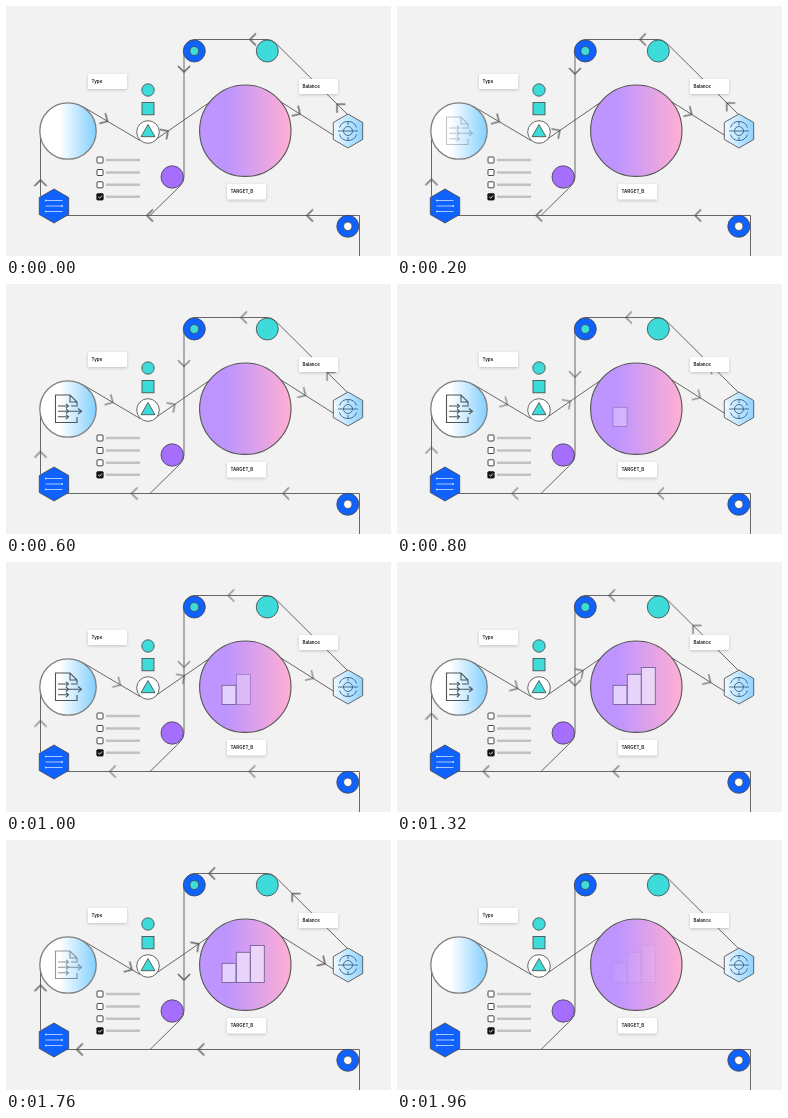
These frames come from a looping animation (385x250 px, 2000 ms). An HTML page:

```html
<!DOCTYPE html>
<html lang="en">
<head>
<meta charset="utf-8">
<title>Data flow</title>
<style>
html, body { margin: 0; width: 100%; height: 100%; overflow: hidden; background: #f2f2f2; }
svg { display: block; width: 385px; height: 250px; }
text { font: 600 4.5px Inter, "Open Sans", sans-serif; fill: #161616; }
.line { fill: none; stroke: #444; stroke-width: .8; }
.node { stroke: #444; stroke-width: .8; }
.blue { fill: #0f62fe; }
.teal { fill: #3ddbd9; }
.label rect { fill: #fff; filter: drop-shadow(0 1px 1.5px #0003); }

.arrows { fill: none; stroke: #555; stroke-width: 1.5; animation: tone 2s linear infinite; }
.arrows use { animation: travel 2s infinite; }
.doc { fill: none; stroke: #4d5358; stroke-width: 1.1; animation: doc 2s linear infinite; }
.bars rect { fill: #f4ecffb0; stroke: #76609a; stroke-width: .9; animation: 2s linear infinite; }
.bars rect:nth-child(1) { animation-name: bar1; }
.bars rect:nth-child(2) { animation-name: bar2; }
.bars rect:nth-child(3) { animation-name: bar3; }

@keyframes travel {
  0% {
    transform: translate(var(--from)) rotate(var(--turn));
    animation-timing-function: cubic-bezier(.364, 0, .636, 1);
  }
  98%, 100% { transform: translate(var(--to)) rotate(var(--turn)); }
}
@keyframes tone {
  0% { opacity: .9; }
  20% { opacity: .75; }
  40%, 50% { opacity: .62; }
  66% { opacity: .72; }
  88%, 90% { opacity: .9; }
  97.5%, 100% { opacity: 0; }
}
@keyframes doc {
  0%, 5% { opacity: 0; }
  20%, 82% { opacity: 1; }
  97%, 100% { opacity: 0; }
}
@keyframes bar1 {
  0%, 35% { opacity: 0; }
  45%, 89% { opacity: 1; }
  99%, 100% { opacity: 0; }
}
@keyframes bar2 {
  0%, 45% { opacity: 0; }
  54%, 89% { opacity: 1; }
  99%, 100% { opacity: 0; }
}
@keyframes bar3 {
  0%, 54% { opacity: 0; }
  63%, 89% { opacity: 1; }
  99%, 100% { opacity: 0; }
}
</style>
</head>
<body>
<svg viewBox="0 0 385 250">
  <defs>
    <linearGradient id="sky">
      <stop offset=".35" stop-color="#fff"/>
      <stop offset="1" stop-color="#82cfff"/>
    </linearGradient>
    <linearGradient id="ice">
      <stop offset="0" stop-color="#f0f9ff"/>
      <stop offset="1" stop-color="#8fd3ff"/>
    </linearGradient>
    <linearGradient id="rose">
      <stop offset=".3" stop-color="#be95ff"/>
      <stop offset="1" stop-color="#ffafd2"/>
    </linearGradient>
    <path id="tip" d="M-6-6 0 0-6 6"/>
    <path id="hex" d="M0-17 14.7-8.5V8.5L0 17-14.7 8.5V-8.5Z"/>
    <g id="option">
      <rect x="91" y="-3" width="6" height="6" rx=".8" fill="#fff" stroke="#333" stroke-width=".9"/>
      <path d="M100 0h34" stroke="#c1c1c1" stroke-width="2.4"/>
    </g>
  </defs>

  <g class="line">
    <path d="M353.5 250V209.5H48M34.500 190V125"/>
    <path d="M144 209.500 174.500 179.500Q178 176 178 171V45A10.500 11.500 0 0 1 188 33.500H261Q266 33.500 269.500 37L342 109"/>
    <path d="M75.700 100 134 134.500M149 134 207 94M275 96 328 129.500"/>
  </g>

  <circle cx="62" cy="125" r="28.200" fill="url(#sky)" stroke="#808080" stroke-width="1.300"/>
  <circle cx="239.300" cy="124.700" r="45.700" fill="url(#rose)" stroke="#555" stroke-width="1.100"/>

  <g class="node">
    <circle class="blue" cx="188.300" cy="45" r="11"/>
    <circle class="teal" cx="188.300" cy="45" r="4.500"/>
    <circle class="teal" cx="261.300" cy="45" r="11"/>
    <circle cx="166.200" cy="171" r="11.200" fill="#a56eff"/>
    <circle class="blue" cx="341.800" cy="220.300" r="11"/>
    <circle cx="341.800" cy="220.300" r="4.200" fill="#fff"/>
    <circle class="teal" cx="142" cy="84" r="6.200"/>
    <rect class="teal" x="136" y="96.500" width="12" height="12.300"/>
    <circle cx="142" cy="126" r="11.300" fill="#fff"/>
    <path class="teal" d="M142 118.500 149 130.700H135Z"/>
    <use href="#hex" class="blue" x="48" y="200"/>
    <use href="#hex" x="342" y="125" fill="url(#ice)"/>
  </g>

  <g stroke="#d0e2ff" stroke-width=".8" fill="#fff">
    <path d="M39.500 194.500h17M39.500 200h17M39.500 205.500h17"/>
    <path d="M39 194.500h1.500M55.500 200h1.500M39 205.500h1.500" stroke-width="1.600"/>
  </g>
  <g fill="none" stroke="#33658a" stroke-width=".9">
    <path d="M333.500 121.500A9 9 0 0 1 350.500 121.500M333.500 128.500A9 9 0 0 0 350.500 128.500"/>
    <circle cx="342" cy="125" r="4.500"/>
    <path d="M332 125h20M342 116v3M342 131v3"/>
  </g>

  <use href="#option" y="154"/>
  <use href="#option" y="166.500"/>
  <use href="#option" y="178.800"/>
  <use href="#option" y="190.800"/>
  <rect x="90.600" y="187.400" width="6.800" height="6.800" rx=".8" fill="#111"/>
  <path d="M92.200 190.800l1.400 1.400 2.400-2.600" fill="none" stroke="#fff" stroke-width=".9"/>

  <g class="doc">
    <path d="M71 121V118L64 111H49.500V138.500H71V133M64 111V118H71"/>
    <path d="M52 122H62M52 127.300H75M52 132.800H62"/>
    <path d="M60 119.800l2.500 2.200-2.500 2.200M60 125l2.500 2.300-2.500 2.200M60 130.600l2.500 2.200-2.500 2.200M65 122h7M72 124.500l3.500 2.800-3.500 2.800"/>
  </g>

  <g class="bars">
    <rect x="216" y="123.300" width="14" height="19.200"/>
    <rect x="230.300" y="112.300" width="14" height="30.200"/>
    <rect x="244.300" y="105.500" width="14" height="37"/>
  </g>

  <g class="arrows">
    <use href="#tip" style="--from:301px,209.5px; --to:189.500px,209.500px; --turn:180deg"/>
    <use href="#tip" style="--from:141px,209.5px; --to:69px,209.500px; --turn:180deg"/>
    <use href="#tip" style="--from:34.5px,174px; --to:34.500px,144.500px; --turn:-90deg"/>
    <use href="#tip" style="--from:101.5px,115.3px; --to:126.500px,130.100px; --turn:30deg"/>
    <use href="#tip" style="--from:162px,125px; --to:193.500px,103.300px; --turn:-34.500deg"/>
    <use href="#tip" style="--from:178px,66px; --to:178px,142px; --turn:90deg"/>
    <use href="#tip" style="--from:244px,33.5px; --to:202px,33.500px; --turn:180deg"/>
    <use href="#tip" style="--from:294px,108px; --to:319.700px,124.200px; --turn:32deg"/>
    <use href="#tip" style="--from:331px,98.2px; --to:285px,52.500px; --turn:225deg"/>
  </g>

  <g class="label">
    <rect x="82" y="68" width="39" height="15" rx="1"/>
    <text x="85.500" y="77.200">Type</text>
    <rect x="293" y="73" width="39" height="15" rx="1"/>
    <text x="296.500" y="82.200">Balance</text>
    <rect x="221" y="178" width="39" height="15.500" rx="1"/>
    <text x="224.500" y="187.200">TARGET_B</text>
  </g>
</svg>
</body>
</html>
```
